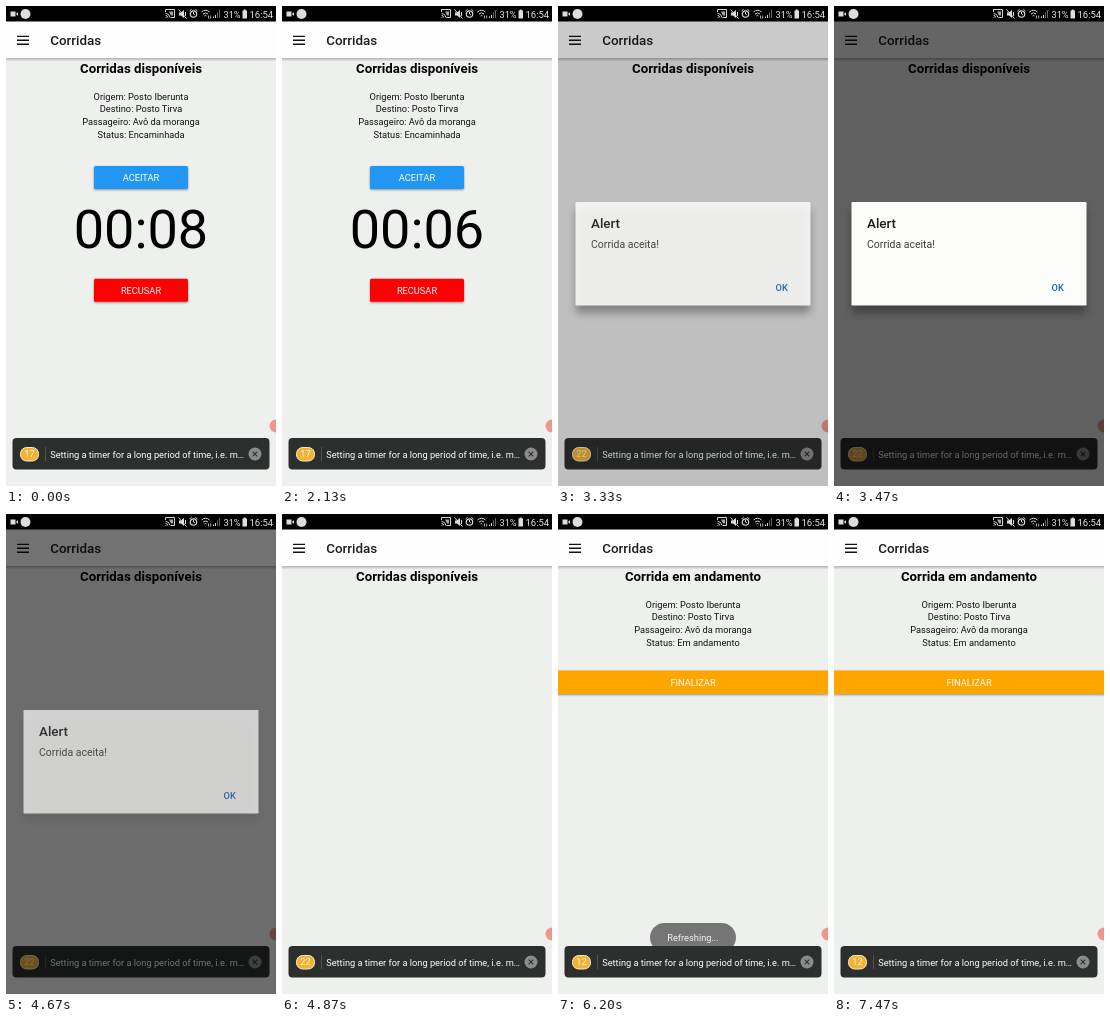
These frames come from a looping animation (270x480 px, 8 s). An HTML page:

```html
<!DOCTYPE html>
<html lang="pt-BR">
<head>
<meta charset="utf-8">
<title>Corridas</title>
<style>
html, body { margin: 0; width: 100%; height: 100%; overflow: hidden; background: #eef0ee; }
svg { display: block; width: 100vw; height: 100vh; }
text { font: 9.25px Roboto, Arial, sans-serif; fill: #111; }
.mid { text-anchor: middle; }
.title { font-size: 13.25px; font-weight: 700; fill: #000; }
.head { font-size: 13.4px; font-weight: 500; fill: #1c1c1c; }
.clock { font-size: 54px; fill: #000; }
.white { fill: #fff; }
.status text { font-size: 9.5px; fill: #e4e4e4; }
.status path { fill: none; stroke: #d8d8d8; }
.raised { filter: drop-shadow(0 1px 1.2px rgba(0, 0, 0, .4)); }

.loop { animation: 8s linear infinite; }
.offer { animation-name: offer; animation-timing-function: step-end; }
.before { animation-name: before; animation-timing-function: step-end; }
.after { animation-name: after; animation-timing-function: step-end; }
.bar { animation-name: bar; animation-timing-function: step-end; }
.ripple { animation-name: ripple; transform-origin: 135px 171.5px; }
.dim { animation-name: dim; }
.alert { animation-name: alert; }
.shade { animation-name: shade; filter: blur(4px); }
.toast { animation-name: toast; }

@keyframes offer { 0% { opacity: 1 } 32.5%, 100% { opacity: 0 } }
@keyframes before { 0% { opacity: 1 } 77.5%, 100% { opacity: 0 } }
@keyframes after { 0% { opacity: 0 } 77.5%, 100% { opacity: 1 } }
@keyframes bar { 0% { opacity: 1 } 61.625% { opacity: 0 } 65.875%, 100% { opacity: 1 } }
@keyframes ripple {
  0%, 26.6% { opacity: 0; transform: scale(.1) }
  27.5% { opacity: .14 }
  30% { opacity: .14; transform: scale(1) }
  32.5%, 100% { opacity: 0; transform: scale(1) }
}
@keyframes dim {
  0%, 41.62% { opacity: 0 }
  41.625% { opacity: .2 }
  43.375%, 58.37% { opacity: .6 }
  58.375% { opacity: .55 }
  60.875%, 100% { opacity: 0 }
}
@keyframes alert {
  0%, 41.62% { opacity: 0 }
  41.625% { opacity: .87 }
  43.375%, 58.37% { opacity: 1 }
  58.375% { opacity: .72 }
  60.25%, 100% { opacity: 0 }
}
@keyframes shade {
  0%, 41.62% { opacity: 0 }
  41.625%, 58.37% { opacity: .32 }
  58.375% { opacity: .06 }
  60.25%, 100% { opacity: 0 }
}
@keyframes toast {
  0%, 61.3% { opacity: 0 }
  62.5% { opacity: .17 }
  66.5%, 88.3% { opacity: 1 }
  93.3%, 100% { opacity: 0 }
}
</style>
</head>
<body>
<svg viewBox="0 0 270 480" preserveAspectRatio="none">
  <defs>
    <clipPath id="accept"><rect x="88" y="160" width="94" height="23" rx="1.5"/></clipPath>
    <linearGradient id="edge" x2="0" y2="1">
      <stop stop-color="#000" stop-opacity=".26"/>
      <stop offset="1" stop-color="#000" stop-opacity="0"/>
    </linearGradient>
  </defs>
  <rect width="270" height="480" fill="#eef0ee"/>

  <!-- header -->
  <rect y="52" width="270" height="3.5" fill="url(#edge)"/>
  <rect y="15" width="270" height="37" fill="#fefefe"/>
  <path d="M11 30.4h12M11 34.3h12M11 38.2h12" stroke="#111" stroke-width="1.4"/>
  <text class="head" x="44.2" y="39.2">Corridas</text>

  <!-- ride offer -->
  <text class="title mid loop before" x="135" y="66.6">Corridas disponíveis</text>
  <g class="mid loop offer">
    <text x="135" y="93.6">Origem: Posto Iberunta</text>
    <text x="135" y="106.3">Destino: Posto Tirva</text>
    <text x="135" y="119">Passageiro: Avô da moranga</text>
    <text x="135" y="131.8">Status: Encaminhada</text>
    <rect class="raised" x="88" y="160" width="94" height="23" rx="1.5" fill="#2196f3"/>
    <g clip-path="url(#accept)"><circle class="loop ripple" cx="135" cy="171.5" r="52"/></g>
    <text class="white" x="135" y="175">ACEITAR</text>
    <text class="clock" id="clock" x="135" y="242.2">00:08</text>
    <rect class="raised" x="88" y="272.7" width="94" height="23" rx="1.5" fill="#fe0000"/>
    <text class="white" x="135" y="287.8">RECUSAR</text>
  </g>

  <!-- ride in progress -->
  <g class="mid loop after">
    <text class="title" x="135" y="66.6">Corrida em andamento</text>
    <text x="135" y="93.6">Origem: Posto Iberunta</text>
    <text x="135" y="106.3">Destino: Posto Tirva</text>
    <text x="135" y="119">Passageiro: Avô da moranga</text>
    <text x="135" y="131.8">Status: Em andamento</text>
    <rect class="raised" x="-1" y="156.5" width="272" height="23.5" fill="#ffa500"/>
    <text class="white" x="135" y="171.7">FINALIZAR</text>
  </g>

  <g class="loop toast">
    <rect x="92" y="409" width="86" height="29" rx="14.5" fill="#747574"/>
    <text class="mid" x="135" y="427" style="fill:#f2f2f2">Refreshing...</text>
  </g>

  <!-- warning bar -->
  <g class="loop bar">
    <rect x="6.5" y="432" width="257" height="31.5" rx="4" fill="#2d2e2e"/>
    <rect x="14.5" y="441.5" width="18" height="13.5" rx="6.2" fill="#f3b232" stroke="#f6ecd6"/>
    <text class="mid" id="badge" x="23.5" y="451.4" style="fill:#fff6de">17</text>
    <path d="M39.5 441v14" stroke="#5a5b5b" stroke-width=".8"/>
    <text class="white" x="44.2" y="451.6">Setting a timer for a long period of time, i.e. m…</text>
    <circle cx="249" cy="448" r="6.5" fill="#8b8c8b"/>
    <path d="M246.7 445.7l4.6 4.6m0-4.6l-4.6 4.6" stroke="#2d2e2e" stroke-width="1.1"/>
  </g>

  <circle cx="270" cy="420" r="6.5" fill="#ee968d"/>

  <!-- dialog -->
  <rect class="loop dim" y="15" width="270" height="465"/>
  <rect class="loop shade" x="18" y="203" width="234" height="104"/>
  <g class="loop alert">
    <rect x="17.5" y="196" width="235" height="103.5" rx="1.2" fill="#fcfdfb"/>
    <text class="head" x="33" y="222">Alert</text>
    <text x="33" y="242.2" style="font-size:10.5px;fill:#3c3c3c">Corrida aceita!</text>
    <text x="217.6" y="284.6" style="font-weight:500;fill:#1a66a8">OK</text>
  </g>

  <!-- status bar -->
  <g class="status">
    <rect width="270" height="15.5"/>
    <path d="M4.5 5.5h5v5h-5zM10 8l2-2v4z" style="fill:#ddd;stroke:none"/>
    <circle cx="19.5" cy="8" r="5" fill="#ddd"/>
    <path d="M159.5 6V3.5h9v8h-4M159.5 11.5h.8M159.5 9.3q2 .2 2.3 2.2M159.5 7.3q4 .4 4.4 4.2"/>
    <path d="M163 5.5h4v4h-2z" style="fill:#aaa;stroke:none"/>
    <path d="M173 6.5h2l3-2.5v8l-3-2.5h-2z" style="fill:#ddd;stroke:none"/>
    <path d="M172.5 3.5l8 9M179.5 6v4"/>
    <circle cx="187.5" cy="8" r="3.2" fill="none" stroke="#d8d8d8" stroke-width="1.2"/>
    <path d="M187.5 6v2l1.4 1M183.6 5l2-1.7M191.4 5l-2-1.7"/>
    <path d="M195.5 6q4-3.6 8 0M197 8q2.5-2.2 5 0M198.5 10q1-1 2 0"/>
    <path d="M202.5 9.5v3M204.7 9.5v3" stroke-width=".8"/>
    <path d="M207.5 12v-1.5M209.5 12V9" />
    <path d="M211.5 12V6.5M213.5 12V4" style="stroke:#666"/>
    <text x="217.5" y="11.6" style="font-size:9.2px">31%</text>
    <path d="M236.5 4.5h1.2V3.4h2v1.1h1.3v8h-4.5z" style="fill:#ddd;stroke:none"/>
    <text x="243.5" y="11.6">16:54</text>
  </g>
</svg>
<script>
const clock = document.getElementById('clock');
const badge = document.getElementById('badge');
// [time in ms, value]
const ticks = [[0, '00:08'], [70, '00:07'], [1070, '00:06'], [2200, '00:05']];
const counts = [[0, 17], [2670, 18], [2730, 19], [2800, 20], [2930, 21], [3000, 22],
  [5200, 1], [5530, 4], [5600, 7], [5670, 9], [5730, 10], [5930, 11], [6200, 12]];

function put(el, steps, t) {
  const value = String(steps.filter(s => s[0] <= t).pop()[1]);
  if (el.textContent !== value) el.textContent = value;
}

let start;
function draw(now) {
  start ??= now;
  const t = (now - start) % 8000;
  put(clock, ticks, t);
  put(badge, counts, t);
  requestAnimationFrame(draw);
}
requestAnimationFrame(draw);
</script>
</body>
</html>
```
